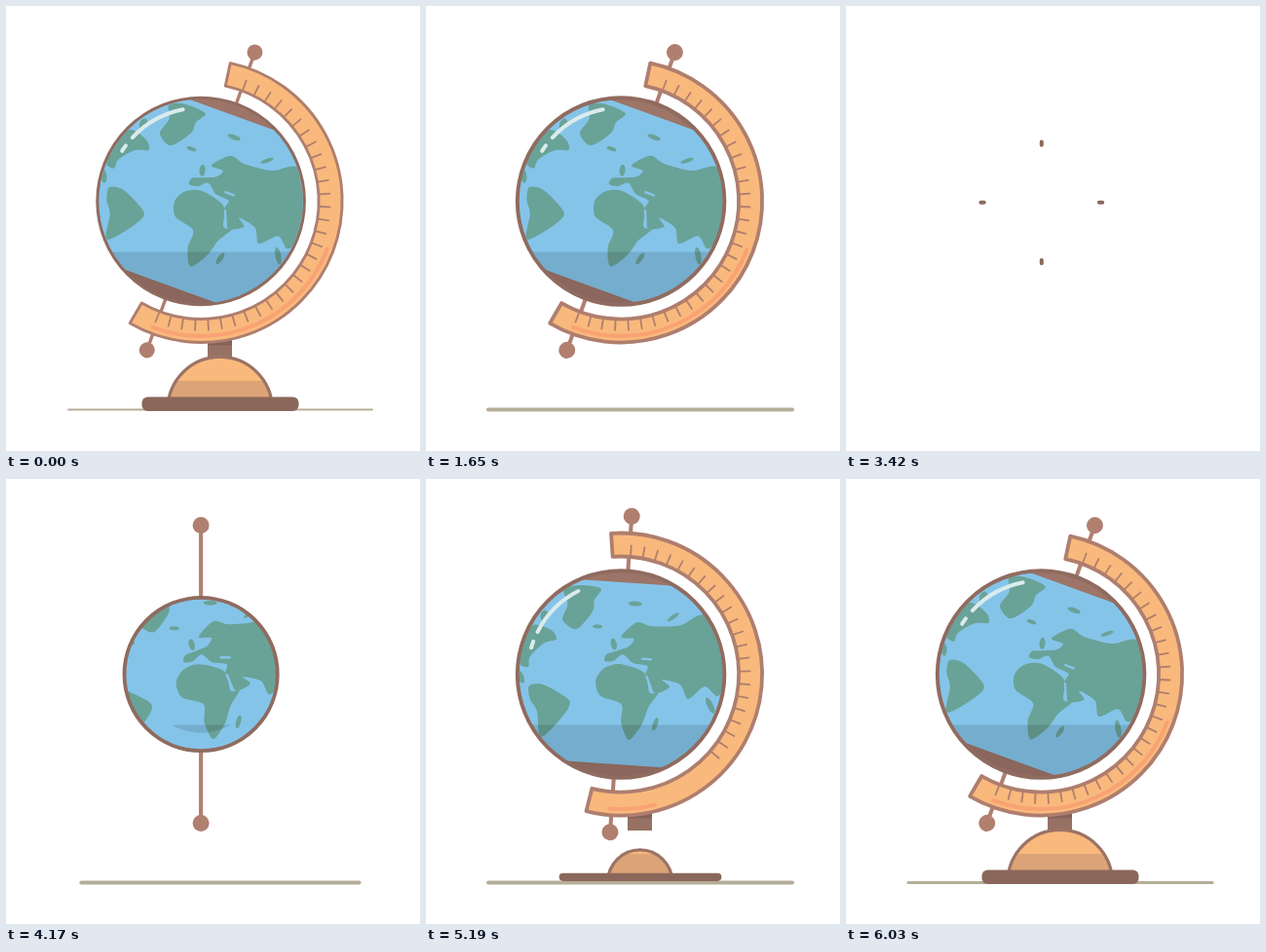
Write an HTML page that moves like this. It is 425x457 px and loops after 7200 ms.

```html
<!DOCTYPE html>
<html lang="en">
<head>
<meta charset="utf-8">
<title>Desk globe</title>
<style>
html, body { margin: 0; width: 100%; height: 100%; overflow: hidden; background: #fff; }
svg { display: block; width: 100vw; height: 100vh; }
#map { fill: #69a297; }
.water { fill: none; stroke: #85c4e9; stroke-width: 2.4; }
.line { fill: none; stroke-linecap: round; }
</style>
</head>
<body>
<svg viewBox="0 0 425 457" xmlns="http://www.w3.org/2000/svg">
  <defs>
    <clipPath id="globeClip"><circle id="globeMask"/></clipPath>
    <clipPath id="landClip"><circle r="104.5"/></clipPath>
    <clipPath id="shadeClip"><circle id="shadeMask"/></clipPath>
    <clipPath id="belowClip"><rect x="-130" y="52" width="260" height="80"/></clipPath>
    <clipPath id="domeClip"><rect x="150" y="340" width="140" height="72"/></clipPath>
    <clipPath id="domeShade"><rect x="150" y="385" width="140" height="27"/></clipPath>
    <radialGradient id="rim">
      <stop offset=".32" stop-color="#5fb3e6" stop-opacity="0"/>
      <stop offset=".62" stop-color="#5fb5ea"/>
      <stop offset=".77" stop-color="#62b1e0"/>
      <stop offset=".87" stop-color="#a0877d"/>
      <stop offset=".95" stop-color="#b08d7f"/>
      <stop offset="1" stop-color="#cfb9ac"/>
    </radialGradient>
  </defs>

  <path id="ground" class="line" stroke="#b4ad98"/>
  <g id="post">
    <rect id="postBody" x="207" y="340" width="25" fill="#987165"/>
    <rect id="postShade" x="207" y="340" width="25" fill="#84625a"/>
  </g>
  <g id="dome" clip-path="url(#domeClip)">
    <circle class="domeDisc" cx="219.7" cy="414" fill="#f9b97c"/>
    <g clip-path="url(#domeShade)"><circle class="domeDisc" cx="219.7" cy="414" fill="#dca476"/></g>
    <circle class="domeDisc" cx="219.7" cy="414" fill="none" stroke="#9b7366" stroke-width="3.2"/>
  </g>
  <rect id="plate" fill="#8b675b"/>

  <g transform="translate(200.1 200.5)">
    <g clip-path="url(#belowClip)"><circle id="shadeOut" fill="#c8c4b2"/></g>
    <g class="tilt">
      <path id="axis" class="line" stroke="#b07f70"/>
      <circle id="knobA" fill="#b07f70"/>
      <circle id="knobB" fill="#b07f70"/>
    </g>
    <g id="globe">
      <g clip-path="url(#globeClip)">
        <rect x="-125" y="-125" width="250" height="250" fill="#85c4e9"/>
        <g class="tilt">
          <g clip-path="url(#landClip)"><g id="map" transform="translate(-200.4 -200.3)"></g></g>
          <path d="M-125 -125H125V-94.3H-125ZM-125 125H125V92.7H-125Z" fill="#9c7468"/>
        </g>
        <g clip-path="url(#shadeClip)"><rect x="-125" y="52" width="250" height="80" opacity=".118"/></g>
        <g class="tilt"><path id="shine" class="line" stroke="#dbebed" stroke-width="4"/></g>
      </g>
      <circle id="outline" fill="none" stroke="#906b5f"/>
      <circle id="soft" fill="url(#rim)"/>
    </g>
    <g class="tilt">
      <path id="sliver" class="line" stroke="#cbc7ad" stroke-width="1.6"/>
      <g id="arm">
        <path id="band" fill="#f9b97c" stroke="#af7e6e" stroke-linejoin="round"/>
        <path id="glow" class="line" stroke="#f9a273" stroke-width="4"/>
        <path id="ticks" class="line" stroke="#af7e6e" stroke-width="1.8"/>
      </g>
    </g>
  </g>
  <path id="burst" class="line" stroke="#8d695c" stroke-width="4"/>
</svg>
<script>
const LOOP = 7200, REBUILD = 3700, TILT = 19.9, RADIUS = 106.3;
const ARM = { from: -7.9, to: 190.3, inner: 121, outer: 145 };
const $ = id => document.getElementById(id);
const tilted = document.querySelectorAll('.tilt');
const domeDiscs = document.querySelectorAll('.domeDisc');

// A few key points per continent, joined by a smooth closed curve.
const CONTINENTS = {
  greenland: '136,118 152,112 174,114 168,126 167,138 152,157 137,149 141,132',
  northAmerica: '93,176 107,156 126,160 132,169 119,174 106,189 105,199 95,196',
  southAmerica: '107,219 119,216 135,222 150,232 144,247 123,270 117,244 109,232',
  africa: '182,196 198,190 224,197 231,217 240,217 231,232 225,251 213,267 204,250 203,231 181,224 175,209',
  eurasia: '183,188 184,181 196,176 207,171 211,163 198,162 213,146 229,149 258,146 283,134 ' +
    '314,168 307,206 300,216 287,207 271,221 262,207 243,203 251,210 236,217 226,200 227,190 212,188 201,180 192,187'
};
const island = (x, y, rx, ry, turn) =>
  `<ellipse rx="${rx}" ry="${ry}" transform="translate(${x} ${y}) rotate(${turn})"/>`;

function smooth(text) {
  const pts = text.split(' ').map(s => s.split(',').map(Number));
  const at = i => pts[(i + pts.length) % pts.length];
  const lean = (i, sign) => at(i).map((v, k) => v + sign * (at(i + 1)[k] - at(i - 1)[k]) / 7);
  return `M${pts[0]}` + pts.map((_, i) => `C${lean(i, 1)} ${lean(i + 1, -1)} ${at(i + 1)}`).join('') + 'Z';
}

$('map').innerHTML =
  Object.values(CONTINENTS).map(c => `<path d="${smooth(c)}"/>`).join('') +
  island(173, 153, 5, 2, 0) +
  island(210, 127, 7, 2.5, 0) +
  island(250, 138, 7, 2, -40) +
  island(191, 170, 3, 6, -15) +
  island(118, 146, 4, 6, 0) +
  island(98, 210, 3, 7, -25) +
  island(239, 249, 2.5, 7, 15) +
  island(294, 226, 3, 9, -30) +
  '<path class="line water" d="M221 183L230 183M227 201L233 215"/>';

const part = (t, start, dur) => Math.min(1, Math.max(0, (t - start) / dur));
const mix = (a, b, p) => a + (b - a) * p;
const linear = p => p;
const inCubic = p => p ** 3;
const outCubic = p => 1 - (1 - p) ** 3;
const inOut = p => p < .5 ? 4 * p ** 3 : 1 - 4 * (1 - p) ** 3;
const inBack = p => 2.2 * p ** 3 - 1.2 * p * p;
const outBack = p => 1 - inBack(1 - p);

// Presence of a part: falls to 0 with one move, returns to 1 with another.
const stage = (t, [outAt, outDur, outEase], [backAt, backDur, backEase]) => t < REBUILD
  ? 1 - outEase(part(t, outAt, outDur))
  : backEase(part(t, backAt, backDur));

const set = (id, attrs) => {
  for (const k in attrs) $(id).setAttribute(k, attrs[k]);
};
const show = (id, on) => set(id, { visibility: on ? 'visible' : 'hidden' });

// Angles run clockwise from the top, in degrees.
const point = (a, r) => {
  const q = a * Math.PI / 180;
  return `${(r * Math.sin(q)).toFixed(2)} ${(-r * Math.cos(q)).toFixed(2)}`;
};
const arcTo = (a, b, r) =>
  `A${r} ${r} 0 ${Math.abs(b - a) > 180 ? 1 : 0} ${b > a ? 1 : 0} ${point(b, r)}`;
const arc = (a, b, r) => `M${point(a, r)}${arcTo(a, b, r)}`;
const spoke = (a, r1, r2) => `M${point(a, r1)}L${point(a, r2)}`;

function drawStand(t, heavy) {
  const half = 156 * stage(t, [1780, 1000, inCubic], [3780, 700, outCubic]);
  show('ground', half > .5);
  set('ground', {
    d: `M${220 - half} 414.5H${220 + half}`,
    'stroke-width': t >= 6030 ? 3.2 : mix(2, 4, heavy)
  });

  const post = 21 * stage(t, [1130, 250, inOut], [4980, 220, outCubic]);
  show('post', post > .4);
  set('postBody', { height: post });
  set('postShade', { height: Math.min(8.5, post) });

  const dome = Math.max(0, 53.6 * stage(t, [900, 400, inBack], [5100, 480, outBack]));
  show('dome', dome > 2);
  domeDiscs.forEach(c => c.setAttribute('r', dome));

  const wide = Math.max(0, 161 * stage(t, [1180, 430, inBack], [4850, 440, outBack]));
  const high = mix(3, 14.4, stage(t, [1100, 290, inOut], [5050, 290, inOut]));
  show('plate', wide > 1);
  set('plate', {
    x: 220 - wide / 2, y: 408.8 - high / 2,
    width: wide, height: high, rx: Math.min(high / 2, 6)
  });
}

function drawAxis(t, heavy) {
  const len = 162.6 * stage(t, [2580, 680, inCubic], [3780, 640, outCubic]);
  const r = mix(8, 8.5, heavy) * Math.min(1, len / 24);
  ['axis', 'knobA', 'knobB'].forEach(id => show(id, len > .5));
  set('axis', { d: `M0 ${-len}V${len}`, 'stroke-width': mix(3.4, 4.1, heavy) });
  set('knobA', { cy: -len, r });
  set('knobB', { cy: len, r });
}

function drawGlobe(t, heavy) {
  const r = Math.max(0, RADIUS * stage(t, [1866, 555, inBack], [3980, 776, outBack]));
  const shade = Math.max(0, RADIUS * stage(t, [1967, 555, inBack], [4040, 776, outBack]));
  const blur = 1 - part(r, 38, 24);
  show('globe', r > 1);
  set('globeMask', { r });
  set('shadeMask', { r: shade });
  set('shadeOut', { r: r > 100 ? Math.min(shade, r) : shade });
  set('outline', { r, 'stroke-width': mix(3, 3.9, heavy), opacity: 1 - blur });
  set('soft', { r: r + 1.5, opacity: blur });

  const end = mix(31, 77.4, stage(t, [1800, 300, inOut], [4500, 230, inOut]));
  let d = end > 31.2 ? arc(-31, -Math.min(end, 67), 96) : '';
  if (end > 73.4) d += arc(-73.4, -end, 96);
  set('shine', { d });
}

function drawArm(t, heavy) {
  const { from, to, inner, outer } = ARM;
  const p = stage(t, [1800, 500, inOut], [4530, 437, inOut]);
  const end = mix(from, to, p);
  const gone = p < .004;
  show('arm', !gone);
  set('band', {
    d: `${arc(from, end, outer)}L${point(end, inner)}${arcTo(end, from, inner)}Z`,
    'stroke-width': mix(2.9, 3.8, heavy)
  });
  show('sliver', gone && t < 3300);
  set('sliver', { d: spoke(from, inner, outer) });

  const reach = 181 * stage(t, [1800, 330, inOut], [4760, 610, linear]);
  let d = '';
  for (let a = .7; a < Math.min(reach, end); a += 6) d += spoke(a, 121.5, 132.5);
  set('ticks', { d });

  const glow = 90 * stage(t, [1800, 200, inOut], [5070, 320, inOut]);
  set('glow', { d: glow > .5 ? arc(181, 181 - glow, 138.6) : '' });
}

function drawBurst(t) {
  const head = 62.4 * outCubic(part(t, 3270, 130));
  const tail = 62.4 * outCubic(part(t, 3290, 210));
  const on = head - tail > .05;
  show('burst', on);
  if (!on) return;
  const x = 200.8, y = 201.8;
  set('burst', {
    d: `M${x + tail} ${y}H${x + head}M${x - tail} ${y}H${x - head}` +
       `M${x} ${y + tail}V${y + head}M${x} ${y - tail}V${y - head}`
  });
}

function draw(t) {
  const heavy = part(t, 20, 100);
  const tilt = t < REBUILD ? TILT : TILT * inOut(part(t, 4920, 740));
  tilted.forEach(g => g.setAttribute('transform', `rotate(${tilt})`));
  drawStand(t, heavy);
  drawAxis(t, heavy);
  drawGlobe(t, heavy);
  drawArm(t, heavy);
  drawBurst(t);
}

const begin = performance.now();
function tick() {
  draw((performance.now() - begin) % LOOP);
  requestAnimationFrame(tick);
}
draw(0);
requestAnimationFrame(tick);
</script>
</body>
</html>
```
